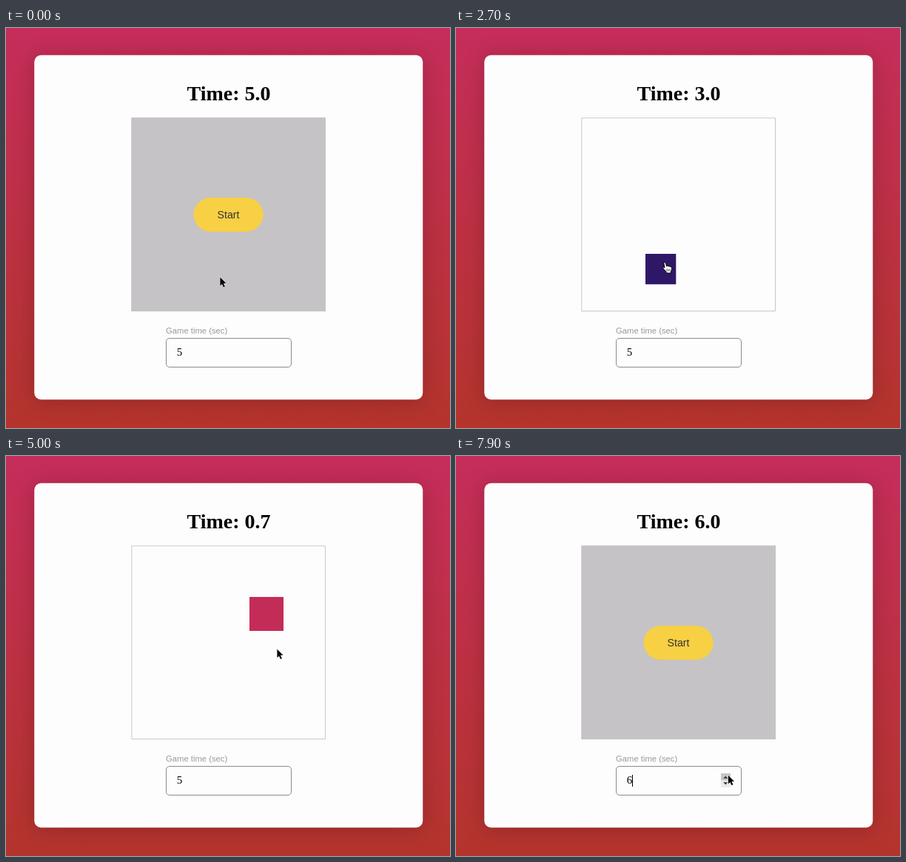
These frames come from a looping animation (600 by 542 pixels, 8 s). An HTML page:

```html
<!DOCTYPE html>
<html lang="en">
<head>
<meta charset="utf-8">
<title>Click game</title>
<style>
  html, body { margin: 0; width: 100%; height: 100%; overflow: hidden; }
  body { background: linear-gradient(#c62d5b, #b4342c); }
  svg { position: absolute; left: 0; top: 0; }
  text { font-family: "Liberation Sans", Arial, sans-serif; }
  .serif { font-family: "Liberation Serif", "Times New Roman", serif; }
  .card { fill: #fefdfe; filter: drop-shadow(0 2px 14px rgba(0, 0, 0, .2)); }
</style>
</head>
<body>
<svg width="600" height="542" viewBox="0 0 600 542">
  <rect class="card" x="38.25" y="36.75" width="525" height="466.7" rx="9"/>
  <text id="title" class="serif" x="301" y="97.5" font-size="28" font-weight="700" text-anchor="middle">Time: 5.0</text>
  <rect x="169.9" y="121.9" width="261.7" height="261.7" fill="none" stroke="#b8b6b8" stroke-width=".75"/>
  <rect id="target"/>
  <g id="menu">
    <rect x="169.5" y="121.5" width="262.5" height="262.5" fill="#c5c3c5"/>
    <rect x="253.5" y="230" width="94" height="46" rx="23" fill="#f8d043"/>
    <text x="300.5" y="257.5" font-size="14.2" fill="#333" text-anchor="middle">Start</text>
  </g>
  <text x="216" y="413.5" font-size="11.25" fill="#999">Game time (sec)</text>
  <rect x="216.5" y="420.5" width="169" height="39" rx="4.5" fill="#fefdfe" stroke="#8c8a8c"/>
  <text id="value" class="serif" x="230.8" y="444" font-size="15">5</text>
  <path id="caret" d="M238.5 432V448" stroke="#000"/>
  <g id="spinner">
    <rect x="358" y="430" width="13" height="19" fill="#ebe9eb"/>
    <rect id="press" x="358" y="430" width="13" height="9.5" fill="#c6c4c6"/>
    <path d="M361.2 437L364.3 433.6L367.4 437ZM361.2 442L364.3 445.4L367.4 442Z" fill="#444"/>
  </g>
  <g id="cursor" stroke-linejoin="round">
    <path id="arrow" transform="translate(.4 -.3) scale(.9)" d="M0 0V12.8L2.9 10.2L5 15L7.2 14L5.1 9.3H9Z" stroke="#fff" paint-order="stroke"/>
    <g id="hand" transform="translate(-1.2 -1.6)" fill="#fff" stroke="#000">
      <path d="M-1.6 .8C-1.6 -.8 .6 -1 1 .6L2.2 5C2.6 3.6 4.4 3.8 4.6 5.2C5.2 4.2 6.8 4.6 7 5.8C7.6 5 9 5.6 9 7C9.2 9.6 8.6 10.6 8 12V14H1.6V12.4C.2 11 -1 9.4 -2.4 7.8C-3.2 6.6 -1.8 5.4 -.4 6.8Z"/>
      <path d="M2.4 8.5V11.5M4.4 8.5V11.5M6.4 8.5V11.5" stroke-width=".7"/>
    </g>
  </g>
</svg>
<script>
const LOOP = 8000, TICK = 100, ROUND = 700;
const START = 700, END = 5700, SPIN = 7200, STEP_UP = 7800;
const el = id => document.getElementById(id);
const show = (id, on) => { el(id).style.display = on ? "" : "none"; };
const box = (x, y, size, fill) => ({ x, y, size, fill });

// a new square every round; the last one is never clicked
const squares = [
  box(180, 319, 50, "#b8521f"),
  box(301.7, 235.1, 45.8, "#174d8d"),
  box(256, 306, 41.3, "#2f1768"),
  box(177, 215, 43, "#7d9426"),
  box(245.7, 326.8, 41.3, "#168a46"),
  box(336, 246, 46, "#1b8794"),
  box(329, 191, 46, "#c42c58"),
  box(388, 150, 42, "#6b2d8c")
];

// the pointer rests briefly, then makes for each square just off its centre
const aim = ({ x, y, size }) => [x + size / 2 + 7, y + size / 2 - 7];
const button = [294.5, 261];
const moves = [button, ...squares.slice(0, -1).map(aim), button]
  .map((to, i) => ({ to, from: i * ROUND + 100, span: 300 }));
moves.push({ to: [367.5, 433], from: 6500, span: 800 });

function pointerAt(t) {
  return moves.reduce((pos, { to, from, span }) => {
    const u = Math.min(1, Math.max(0, (t - from) / span));
    const k = u * u * (3 - 2 * u);
    return pos.map((p, i) => p + (to[i] - p) * k);
  }, [289, 338]);
}

function drawSquare({ x, y, size, fill }) {
  const attrs = { x, y, width: size, height: size, fill };
  for (const name in attrs) el("target").setAttribute(name, attrs[name]);
}

function draw(t) {
  const playing = t >= START && t < END;
  const stepped = t >= STEP_UP;
  const [px, py] = pointerAt(t);
  let hover = false;

  if (playing) {
    const s = squares[Math.floor((t - START) / ROUND)];
    drawSquare(s);
    hover = px >= s.x && px <= s.x + s.size && py >= s.y && py <= s.y + s.size;
  }

  const left = playing ? (END - t) / 1000 : stepped ? 6 : 5;
  el("title").textContent = t >= END && !stepped ? "Your Score: 7" : "Time: " + left.toFixed(1);
  el("value").textContent = stepped ? "6" : "5";
  show("target", playing);
  show("menu", !playing);
  show("caret", stepped);
  show("spinner", t >= SPIN);
  show("press", stepped);
  show("hand", hover);
  show("arrow", !hover);
  el("cursor").setAttribute("transform", `translate(${px} ${py})`);
}

function frame() {
  draw(Math.floor(performance.now() % LOOP / TICK) * TICK);
  requestAnimationFrame(frame);
}
frame();
</script>
</body>
</html>
```
